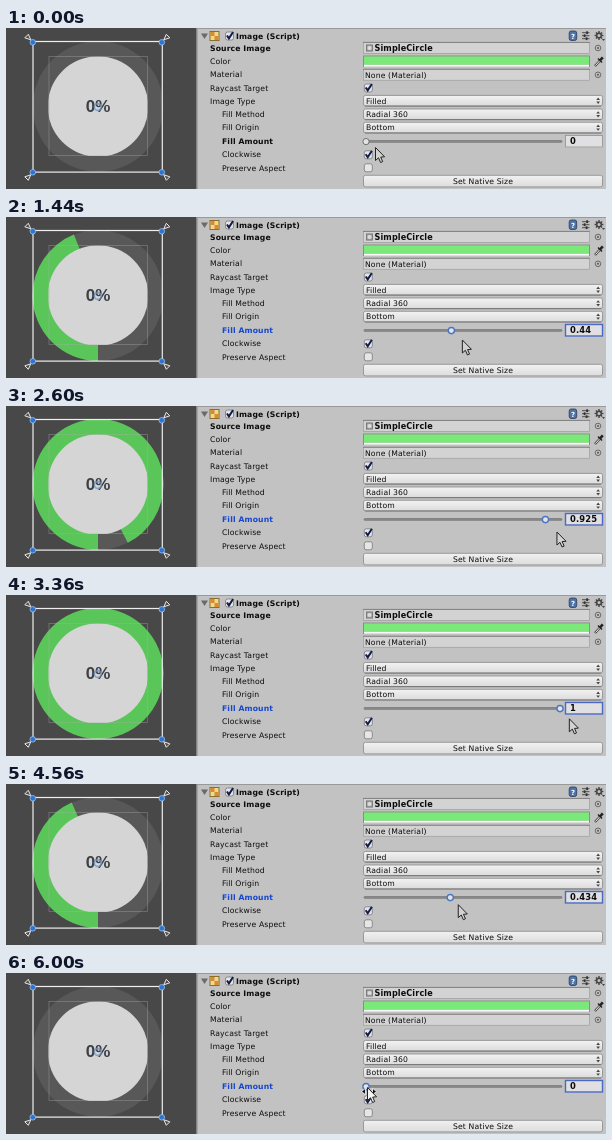
These frames come from a looping animation (600 px wide and 161 px high, 6.04 s). An HTML page with a canvas:

```html
<!DOCTYPE html>
<html>
<head>
<meta charset="utf-8">
<title>Radial fill inspector</title>
<style>
html, body { margin: 0; width: 100%; height: 100%; overflow: hidden; background: #c2c2c2; }
canvas { display: block; width: 600px; height: 161px; }
</style>
</head>
<body>
<canvas id="stage"></canvas>
<script>
const LOOP = 6040, STEP = 40, FOCUS_AT = 200, SLIDE_AT = 5840;
const canvas = document.getElementById('stage');
const dpr = window.devicePixelRatio || 1;
canvas.width = 600 * dpr;
canvas.height = 161 * dpr;
const c = canvas.getContext('2d');
const UI = '"DejaVu Sans", sans-serif';
const TAU = Math.PI * 2;

// Time and value pairs
const fillKeys = [[0, 0], [280, 0], [480, .03], [720, .129], [1440, .44], [2600, .925],
  [2800, 1], [3480, 1], [3600, .955], [4000, .739], [5120, .137], [5400, 0], [6040, 0]];
const offsetKeys = [[0, 9.5], [720, 15], [1440, 11], [2600, 11.5], [3480, 9], [4000, 8],
  [5120, 8], [5400, 9], [5760, 5], [6000, 1.5], [6040, 1.5]];
const heightKeys = [[0, 119.5], [720, 122.5], [1440, 123], [2600, 126], [4000, 121.5],
  [5120, 120], [5440, 119.5], [6000, 114.5], [6040, 114.5]];

// Monotone cubic interpolation: smooth, without overshoot
function sample(keys, t) {
  let i = 0;
  while (i < keys.length - 2 && t >= keys[i + 1][0]) i++;
  const slope = j => j < 0 || j > keys.length - 2 ? 0
    : (keys[j + 1][1] - keys[j][1]) / (keys[j + 1][0] - keys[j][0]);
  const tangent = j => {
    const a = slope(j - 1), b = slope(j);
    return a * b <= 0 ? 0 : 2 * a * b / (a + b);
  };
  const [t0, v0] = keys[i], [t1, v1] = keys[i + 1];
  const h = t1 - t0, u = (t - t0) / h, w = 1 - u;
  return v0 * (1 + 2 * u) * w * w + tangent(i) * h * u * w * w
    + v1 * u * u * (3 - 2 * u) - tangent(i + 1) * h * u * u * w;
}

function rect(x, y, w, h, fill) {
  c.fillStyle = fill;
  c.fillRect(x, y, w, h);
}

function frame(x, y, w, h, color, width = 1) {
  c.strokeStyle = color;
  c.lineWidth = width;
  c.strokeRect(x, y, w, h);
}

function paint(fill, stroke, width) {
  if (fill) { c.fillStyle = fill; c.fill(); }
  if (stroke) { c.strokeStyle = stroke; c.lineWidth = width; c.stroke(); }
}

function disc(x, y, r, fill, stroke, width = 1) {
  c.beginPath();
  c.arc(x, y, r, 0, TAU);
  paint(fill, stroke, width);
}

function poly(points, fill, stroke, width = 1) {
  c.beginPath();
  points.forEach(([x, y]) => c.lineTo(x, y));
  c.closePath();
  paint(fill, stroke, width);
}

function line(points, color, width = 1) {
  c.beginPath();
  points.forEach(([x, y]) => c.lineTo(x, y));
  paint(null, color, width);
}

function pill(x, y, w, h, fill, stroke) {
  c.beginPath();
  c.roundRect(x, y, w, h, 2);
  paint(fill, stroke, .8);
}

function text(str, x, y, { bold = false, color = '#0c0c0c', align = 'left', size = 7.7 } = {}) {
  c.font = `${bold ? 'bold ' : ''}${size}px ${UI}`;
  c.letterSpacing = '0.12px';
  c.fillStyle = color;
  c.textAlign = align;
  c.textBaseline = 'alphabetic';
  c.fillText(str, x, y + 2.8);
}

function shade(y, h) {
  const g = c.createLinearGradient(0, y, 0, y + h);
  g.addColorStop(0, '#f2f2f2');
  g.addColorStop(1, '#dcdcdc');
  return g;
}

function field(y) {
  rect(357, y - 6, 227, 12, '#d3d3d3');
  frame(357.5, y - 5.5, 226, 11, '#a0a0a0', .8);
  line([[357, y - 5.6], [584, y - 5.6]], '#777', .8);
  disc(592, y, 2.8, null, '#555', .8);
  disc(592, y, 1, '#555');
}

function dropdown(y, label) {
  pill(357.5, y - 5.3, 239, 10.6, shade(y - 5, 10), '#8a8a8a');
  line([[359, y + 5.4], [595, y + 5.4]], '#6a6a6a', .8);
  text(label, 360, y);
  poly([[590.3, y - .7], [594, y - .7], [592.15, y - 3.1]], '#444');
  poly([[590.3, y + .8], [594, y + .8], [592.15, y + 3.2]], '#444');
}

function checkbox(x, y, on) {
  pill(x - 4, y - 4, 8, 8, '#e6e6e6', '#777');
  if (on) line([[x - 2.6, y - .5], [x - .6, y + 2.4], [x + 3.6, y - 4]], '#101c4c', 2);
}

function scene(value) {
  const x = 92, y = 78.5;
  rect(0, 0, 191, 161, '#484848');
  disc(x, y, 65.3, '#585858');
  if (value > 0) {
    c.beginPath();
    c.moveTo(x, y);
    c.arc(x, y, 65.5, Math.PI / 2, Math.PI / 2 + value * TAU);
    c.closePath();
    paint('#5ac659');
  }
  c.save();
  c.beginPath();
  c.rect(42.5, y - 50, 99, 99.5);
  c.clip();
  disc(x, y, 50.3, '#d5d5d5');
  c.restore();
  frame(43, y - 50, 98.5, 99, 'rgba(175,175,175,.5)', .7);

  c.font = 'bold 17px "Liberation Sans", Arial, sans-serif';
  c.letterSpacing = '0px';
  c.textAlign = 'center';
  c.textBaseline = 'alphabetic';
  c.fillStyle = '#3c3f44';
  c.fillText('0%', 92, y + 5.9);
  disc(91.8, y + .5, 3.4, null, 'rgba(105,145,195,.75)', 1.6);

  frame(27, y - 65, 129.3, 130.6, '#eee', 1.2);
  for (const sx of [-1, 1]) for (const sy of [-1, 1]) {
    const cx = 91.3 + sx * 64.5, cy = y + .8 + sy * 65;
    disc(cx, cy, 2.8, '#2f74d0', '#a9cdf5', .7);
    poly([[cx + sx * 2, cy + sy * 2.5], [cx + sx * 8, cy + sy * 4.5], [cx + sx * 4.5, cy + sy * 8]],
      '#505050', '#e8e8e8', 1);
  }
}

function header() {
  line([[191, .5], [600, .5]], '#999');
  poly([[195, 5.5], [202, 5.5], [198.5, 11]], '#6a6a6a');
  rect(203.5, 3, 10, 10, '#8c6d2c');
  rect(204.5, 4, 8, 8, '#efd892');
  rect(204.5, 4, 4, 4, '#d88b2f');
  rect(208.5, 8, 4, 4, '#d88b2f');
  checkbox(223.5, 8, true);
  text('Image (Script)', 230, 7.8, { bold: true });
  pill(563.2, 3, 7.5, 9.5, '#4f73a5', '#273b5c');
  text('?', 567, 7.8, { bold: true, color: '#fff', align: 'center', size: 7 });
  [[4.7, 581], [7.7, 578.5], [10.7, 580.5]].forEach(([y, x]) => {
    line([[576, y], [583.5, y]], '#444', .9);
    rect(x - .8, y - 1.4, 1.8, 2.8, '#333');
  });
  for (let i = 0; i < 8; i++) {
    const a = i * TAU / 8, dx = Math.cos(a), dy = Math.sin(a);
    line([[593 + dx * 2, 7.5 + dy * 2], [593 + dx * 4.4, 7.5 + dy * 4.4]], '#444', 1.4);
  }
  disc(593, 7.5, 2.3, '#c2c2c2', '#444', 1.5);
  poly([[596, 11], [599, 11], [597.5, 13]], '#444');
}

function inspector(value, focused) {
  rect(191, 0, 409, 161, '#c2c2c2');
  rect(190, 0, 1.5, 161, '#858585');
  header();

  text('Source Image', 204, 20, { bold: true });
  field(20);
  rect(360, 16.5, 7, 7, '#a5a5a5');
  frame(360.5, 17, 6, 6, '#6c6c6c', .7);
  disc(363.5, 20, 2, '#ddd');
  text('SimpleCircle', 368.5, 20, { bold: true, size: 8.1 });

  text('Color', 204, 33.3);
  rect(357, 27.5, 227, 11.5, '#8c8c8c');
  rect(358, 28.4, 225, 8.4, '#7be979');
  rect(358, 36.8, 225, 1.9, '#fff');
  line([[589, 38], [594, 32.5]], '#444', 2.4);
  line([[589.5, 37.5], [594, 32.5]], '#eee', 1);
  line([[592, 30.5], [596, 34.5]], '#222', 1.4);
  line([[594, 32.5], [596.8, 29.3]], '#222', 2.6);

  text('Material', 204, 46.6);
  field(46.8);
  text('None (Material)', 359, 46.8);

  text('Raycast Target', 204, 60);
  checkbox(362.3, 60, true);

  text('Image Type', 204, 73);
  dropdown(72.7, 'Filled');
  text('Fill Method', 216, 86.3);
  dropdown(86.3, 'Radial 360');
  text('Fill Origin', 216, 99.6);
  dropdown(99.6, 'Bottom');

  text('Fill Amount', 216, 113, { bold: true, color: focused ? '#1746cf' : '#0c0c0c' });
  pill(358, 112.6, 198, 1.7, '#8b8b8b', '#777');
  disc(360 + value * 194, 113.6, 3.1, '#e2e4ea', focused ? '#4c76bd' : '#666', focused ? 1.4 : .9);
  rect(559, 107, 38, 12.5, '#e0e0e2');
  frame(559.5, 107.5, 37, 11.5, focused ? '#4a68c4' : '#8d8d8d', focused ? 1.4 : .8);
  text(String(+value.toFixed(3)), 564, 113.2, { bold: true, size: 8.4 });

  text('Clockwise', 216, 126.5);
  checkbox(362.3, 126.8, true);
  text('Preserve Aspect', 216, 139.7);
  checkbox(362.3, 139.8, false);

  pill(357.5, 147.3, 239, 11.6, shade(147, 12), '#888');
  text('Set Native Size', 477, 153.2, { align: 'center' });
}

function cursor(x, y, sliding) {
  if (sliding) {
    for (const s of [-1, 1]) {
      const px = x + 1.5;
      poly([[px + s * 7.5, y + 4], [px + s * 3.5, y + .8], [px + s * 3.5, y + 7.2]],
        '#111', '#fff', .8);
    }
  }
  poly([[0, 0], [0, 13], [3, 10.3], [5.1, 15], [7.2, 14.1], [5.2, 9.6], [9.1, 9.3]]
    .map(([px, py]) => [x + px, y + py]), sliding ? '#f4f4f4' : '#d2d2d2', '#222', 1);
}

function draw(now) {
  const t = Math.floor((now % LOOP) / STEP) * STEP;
  const value = Math.min(1, Math.max(0, sample(fillKeys, t)));
  c.setTransform(dpr, 0, 0, dpr, 0, 0);
  scene(value);
  inspector(value, t >= FOCUS_AT);
  cursor(360 + value * 194 + sample(offsetKeys, t), sample(heightKeys, t), t >= SLIDE_AT);
}

const start = performance.now();
function tick() {
  draw(performance.now() - start);
  requestAnimationFrame(tick);
}
tick();
</script>
</body>
</html>
```
